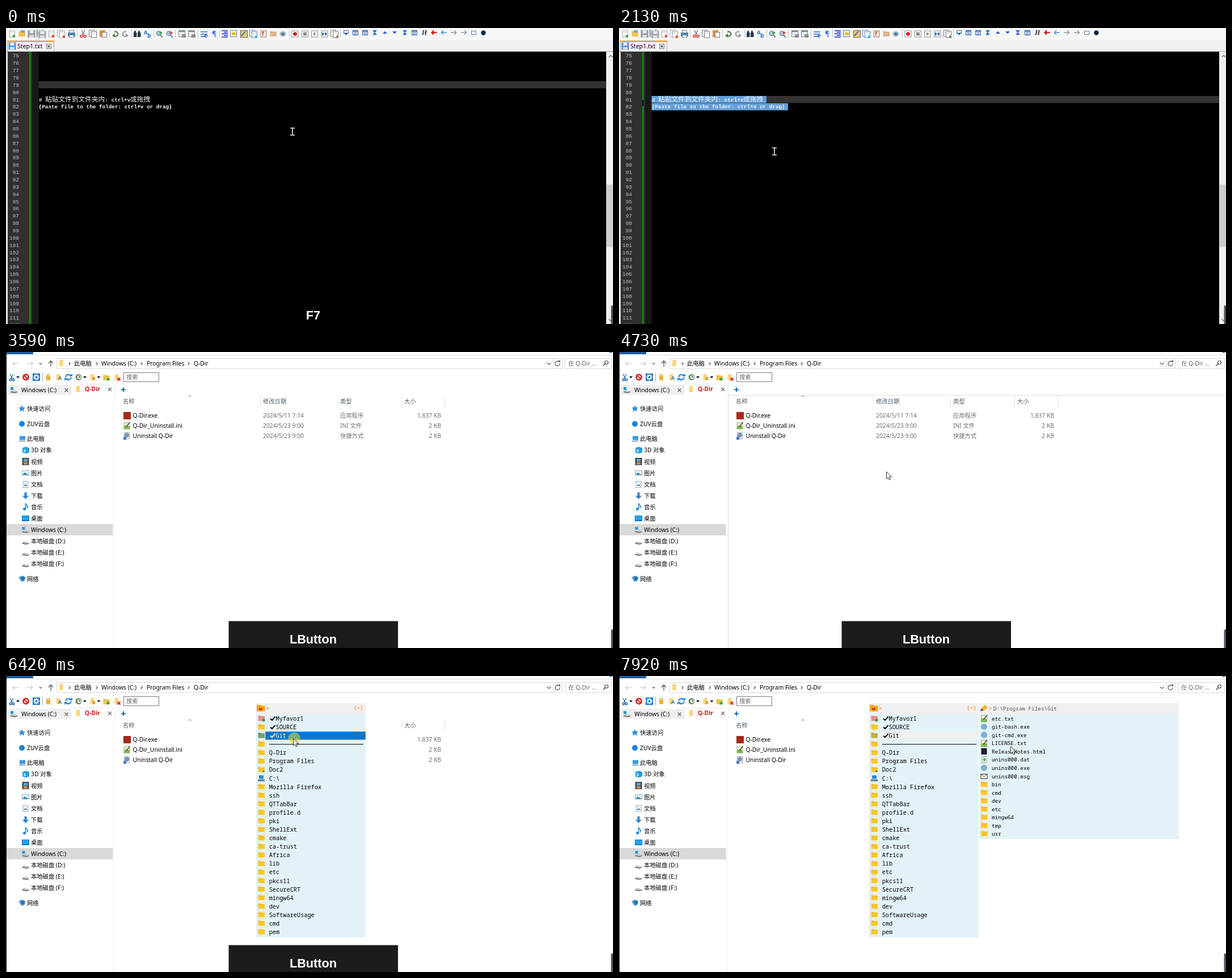
An HTML page with a canvas that plays this animation: 1070x523 px, repeating every 7990 ms.

```html
<!DOCTYPE html>
<html lang="zh">
<head>
<meta charset="utf-8">
<style>
html, body { margin: 0; width: 100%; height: 100%; overflow: hidden; background: #fff; }
canvas { display: block; }
</style>
</head>
<body>
<canvas id="stage" width="1070" height="523"></canvas>
<script>
const g = document.getElementById('stage').getContext('2d');
const LOOP = 7990;
const UI = '"Noto Sans", "Noto Sans CJK SC", "Noto Sans CJK", sans-serif';
const MONO = '"Noto Sans Mono", monospace';
const CODE = '"Liberation Mono", monospace';
const KEYS = '"Liberation Sans", sans-serif';

// ---- drawing helpers ----
function box(x, y, w, h, color) { g.fillStyle = color; g.fillRect(x, y, w, h); }
function frame(x, y, w, h, color, fill) {
  if (fill) box(x, y, w, h, fill);
  g.strokeStyle = color; g.lineWidth = 1; g.strokeRect(x + .5, y + .5, w - 1, h - 1);
}
function dot(x, y, r, color) { g.fillStyle = color; g.beginPath(); g.arc(x, y, r, 0, 7); g.fill(); }
function ring(x, y, r, color, width = 1.5, end = 6.3) {
  g.strokeStyle = color; g.lineWidth = width; g.beginPath(); g.arc(x, y, r, 0, end); g.stroke();
}
function trace(pts) {
  g.beginPath();
  for (let i = 0; i < pts.length; i += 2) g.lineTo(pts[i], pts[i + 1]);
}
function line(color, width, ...pts) { g.strokeStyle = color; g.lineWidth = width; trace(pts); g.stroke(); }
function poly(color, ...pts) { g.fillStyle = color; trace(pts); g.fill(); }
function text(s, x, y, { size = 10.3, color = '#000', font = UI, weight = 400, align = 'left' } = {}) {
  g.font = `${weight} ${size}px ${font}`;
  g.fillStyle = color; g.textAlign = align;
  g.fillText(s, x, y + size * .36);
}
function chevron(x, y, dx, dy, color = '#555', width = 1.2) {
  line(color, width, x - dx - 2 * dy, y - dy - 2 * dx, x + dx, y + dy, x - dx + 2 * dy, y - dy + 2 * dx);
}
function cross(x, y, r, color, width = 1.3) {
  line(color, width, x - r, y - r, x + r, y + r);
  line(color, width, x - r, y + r, x + r, y - r);
}
function arrow(x, y, dir, color, len = 4.5, width = 1.6) {
  line(color, width, x - len * dir, y, x + len * dir, y);
  line(color, width, x + (len - 3.5) * dir, y - 3.5, x + len * dir, y, x + (len - 3.5) * dir, y + 3.5);
}

// ---- icons, centred on x, y ----
function folder(x, y, color = '#ffc627') {
  box(x - 5.5, y - 5, 5, 3, color);
  box(x - 5.5, y - 4, 11.5, 8.5, color);
  box(x - 5.5, y - 3, 11.5, 1, 'rgba(170,110,0,.15)');
}
function slimFolder(x, y, mark) {
  box(x - 4, y - 5.5, 7, 11, '#f9d375');
  box(x - 4, y - 5.5, 2.5, 11, '#ffe49c');
  if (mark) box(x + 1, y, 4, 5, mark);
}
function page(x, y, mark, edge = '#9aa6b0') {
  frame(x - 5, y - 6, 10, 12, edge, '#fff');
  box(x - 3, y - 3, 6, 1, '#c3ccd3');
  if (mark) dot(x + 3, y + 4, 2.4, mark);
}
function pages(x, y, mark, edge) { page(x - 2, y - 1, null, edge); page(x + 2, y + 1, mark, edge); }
function floppy(x, y, color) {
  box(x - 6.5, y - 6.5, 13, 13, color);
  box(x - 3.5, y - 6, 7, 5, '#e9f1f7');
  box(x - 4, y + 1.5, 8, 5, '#d6dde2');
}
function note(x, y) {
  frame(x - 5.5, y - 5.5, 11, 12, '#9aa58c', '#f6f6e6');
  poly('#7dbb4c', x - 5, y + 6, x - 5, y + 1, x + 1, y - 1, x + 5, y + 2, x + 5, y + 6);
  line('#564a30', 1.6, x - 1, y + 2, x + 5.5, y - 6);
}
function drive(x, y, system) {
  poly('#c4c8cb', x - 6, y + 2, x - 3, y, x + 6, y + 2, x + 6, y + 4, x + 3, y + 5, x - 6, y + 4);
  line('#5c6063', 1.3, x - 6, y + 3.5, x + 2, y + 5, x + 6, y + 3.5);
  if (system) box(x - 6, y - 5, 5, 5, '#1f9ae0');
}
function table(x, y) {
  frame(x - 5, y - 4, 10, 9, '#2b62b8', '#fff');
  box(x - 5, y - 4, 10, 2.5, '#2b62b8');
  line('#2b62b8', 1, x - 3, y + .5, x + 3, y + .5);
  line('#2b62b8', 1, x - 3, y + 2.8, x + 3, y + 2.8);
}
function triangle(x, y, dir, color = '#2468c8') { poly(color, x - 4, y + 2 * dir, x + 4, y + 2 * dir, x, y - 2.5 * dir); }
function lens(x, y, mark) {
  line('#777', 2, x + 1, y + 1, x + 6, y + 6);
  dot(x - 1, y - 1, 4, '#a8c6dc'); ring(x - 1, y - 1, 4, '#5c7484', 1);
  dot(x + 3, y - 2, 2.3, mark);
}
function magnifier(x, y) { ring(x + 1.5, y - 1.5, 3, '#444', 1.2); line('#444', 1.5, x - 1, y + 1, x - 4.5, y + 4.5); }

// ---- editor ----
const rowY = n => 49 + (n - 75) * 12.86;
const rowBar = (n, width, color) => box(57.5, Math.round(rowY(n) - 6.5), width, 12.5, color);

function editorToolbar() {
  box(0, 0, 1070, 21, '#f7f7f7');
  for (const x of [125, 182, 221, 260, 298, 338, 376, 499, 589]) box(x, 3, 1, 14, '#c8c8c8');
  const y = 10.5;
  page(11, y, '#3ba83b');
  folder(28, y, '#f3c24e'); box(26, 4, 7, 4, '#6ba5d8');
  floppy(45, y, '#8e979d'); floppy(60, y - 1, '#a0a6aa'); floppy(64, y + 1, '#a0a6aa');
  page(80, y, '#e8502c'); pages(97, y, '#e8502c');
  box(109, 8, 13, 7, '#4d87b8'); frame(111, 4, 9, 5, '#6b7f8c', '#fff'); frame(111, 12, 9, 5, '#6b7f8c', '#fff');
  line('#777', 1.4, 133, 4, 138, 13); line('#777', 1.4, 139, 4, 134, 13);
  ring(133, 14.5, 2, '#d83030'); ring(139, 14.5, 2, '#d83030');
  pages(153, y, null, '#777');
  box(165, 4, 10, 12, '#d79a3c'); frame(169, 7, 9, 10, '#777', '#fff');
  for (const [x, dir, c] of [[193, -1, '#4c7c44'], [210, 1, '#999']]) {
    ring(x, 10.5, 4.2, c, 2.2);
    box(x + (dir < 0 ? -6 : 2), 6, 4, 9, '#f7f7f7');
    poly(c, x + 6 * dir, 13.5, x + dir, 9.5, x + dir, 17);
  }
  for (const x of [228, 235]) { box(x - 3, 8, 5.5, 8, '#26384a'); box(x - 2, 5, 3, 4, '#26384a'); }
  text('a', 243, 7, { color: '#246ac0', weight: 700 }); text('b', 249, 13, { color: '#246ac0', weight: 700 });
  lens(270, y, '#38a838'); lens(288, y, '#e04030');
  for (const x of [310, 327]) { frame(x - 6, 4, 12, 12, '#808a90', '#e8ecee'); box(x - 6, 4, 12, 3, '#808a90'); box(x, 11, 7, 6, '#8d8d8d'); }
  for (const [i, w] of [12, 12, 7].entries()) box(343, 6 + i * 4, w, 1.6, '#3777c4');
  arrow(353, 14, -1, '#3777c4', 3);
  text('¶', 363, y, { size: 12, color: '#3777e0', weight: 700 });
  for (let i = 0; i < 5; i++) box(i % 2 ? 384 : 380, 4 + i * 2.8, i % 2 ? 7 : 11, 1.5, '#2030c8');
  frame(395, 4, 12, 12, '#4a86c0', '#fff5c8'); box(398, 8, 7, 4, '#f0b030');
  frame(413, 4, 13, 13, '#557', '#f2d060'); line('#3a78c0', 2, 415, 14, 422, 6);
  pages(436, y, '#5aaae6', '#4a86c0');
  page(454, y, null, '#a06030'); text('f', 451, 10, { color: '#d05020', weight: 700 });
  folder(471, y, '#e2b48c');
  g.fillStyle = '#d0dde8'; g.beginPath(); g.ellipse(488, y, 6.5, 4, 0, 0, 7); g.fill();
  ring(488, y, 4, '#788', 1); dot(488, y, 2.5, '#2f6fa8');
  for (const x of [509.5, 527, 544, 561.5]) frame(x - 6, 4.5, 12, 12, '#8a9298', '#fafafa');
  dot(509.5, y, 3.3, '#d81818'); box(524, 7.5, 6, 6, '#8c8c8c');
  poly('#8c9c8c', 542, 7, 547, 10.5, 542, 14);
  poly('#2468b8', 557, 7, 561, 10.5, 557, 14); poly('#2468b8', 562, 7, 566, 10.5, 562, 14);
  pages(579, y, '#888', '#777');
  frame(595, 4, 9, 6, '#2b62b8', '#fff'); triangle(599.5, 10.5, -1);
  table(616, 8); table(633, 8); table(720, 8);
  for (const x of [650, 703]) { triangle(x, 6, -1); triangle(x, 10, 1); }
  triangle(668, 8, 1); triangle(685, 8, -1);
  text('H', 733, 8, { size: 11, font: '"Noto Serif", serif', weight: 'italic 700', color: '#333' });
  arrow(755, 8, -1, '#d81010', 4.5, 2.2); arrow(772, 8, -1, '#4a8ee0');
  arrow(789, 8, 1, '#999'); arrow(807, 8, 1, '#999');
  frame(820, 5, 9, 7, '#4a7eb8', '#fff');
  dot(841.5, 8.5, 4.2, '#10233f');
}

function editor(t) {
  const current = t < 700 ? 79 : t < 880 ? 83 : t < 1150 ? 82 : t < 2740 ? 81 : 88;
  box(0, 0, 1070, 523, '#000');
  editorToolbar();
  box(0, 21, 1070, 21, '#f0f0f0'); box(0, 41, 1070, 1, '#a0a0a0');
  frame(2, 22, 83, 20, '#a8a8a8', '#f5f5f5'); box(2, 22, 82, 3, '#faaa3c');
  floppy(11, 32, '#4b93d8');
  text('Step1.txt', 20, 32.5, { size: 10.6 });
  frame(71, 28, 9, 9, '#777'); cross(75.5, 32.5, 2, '#555');

  box(0, 42, 3, 481, '#e4e4e4');
  box(3, 42, 43, 481, '#303030'); box(46, 42, 11.5, 481, '#181818');
  box(41, 42, 2.4, 481, '#0c960c');
  if (t > 1450) box(41, 127, 2.4, 11, '#111');
  for (let n = 75; n < 113; n++) text(n, 23, rowY(n), { size: 9.4, color: '#c4c4c4', font: CODE, align: 'right' });

  rowBar(current, 1000.5, '#333');
  const selected = '#639ed8';
  if (t >= 1150 && t < 2740) rowBar(81, 202.5, selected);
  if (t >= 880 && t < 2740) rowBar(82, 240.5, selected);
  const bold = { size: 9.33, color: '#f4f4f4', font: CODE, weight: 700 };
  const han = { size: 11.7, color: '#f4f4f4', weight: 500 };
  text('#', 58, rowY(81), bold);
  text('粘贴文件到文件夹内', 69, rowY(81) - .5, han);
  text(': ctrl+v', 174.5, rowY(81), bold);
  text('或拖拽', 219, rowY(81) - .5, han);
  const english = '(Paste file to the folder: ctrl+v or drag)';
  text(english, 57.6, rowY(82), bold);
  text(english.replace(/[^():+]/g, ' '), 57.6, rowY(82), { ...bold, color: '#e6dc98' });
  if (t >= 2740 && t < 3320) box(57, 209, 1, 14, '#fff');

  box(1058, 42, 12, 481, '#f0f0f0'); box(1058.5, 277, 11.5, 110, '#cdcdcd');
  chevron(1066, 50, 0, -1.6); chevron(1066, 516, 0, 1.6);
}

// ---- file manager ----
const sidebar = [
  ['快速访问', 100], ['ZUV云盘', 127], ['此电脑', 153.5], ['3D 对象', 173.5], ['视频', 194], ['图片', 214],
  ['文档', 234], ['下载', 254], ['音乐', 274], ['桌面', 294], ['Windows (C:)', 314], ['本地磁盘 (D:)', 334.5],
  ['本地磁盘 (E:)', 354.5], ['本地磁盘 (F:)', 374.5], ['网络', 401]
];
const sideIcons = [
  y => poly('#2f8fdc', 28, y - 6, 30, y - 2, 34, y - 2, 31, y + 1, 32, y + 5.5, 28, y + 3, 24, y + 5.5, 25, y + 1, 22, y - 2, 26, y - 2),
  y => dot(28, y, 5, '#1683d8'),
  y => { box(24, y - 5, 10, 7, '#3a9be0'); line('#8fa3b0', 2, 23, y + 4, 34, y + 4); },
  y => { poly('#1e9ee6', 29, y - 4, 35, y - 6, 41, y - 4, 41, y + 4, 35, y + 6, 29, y + 4); poly('#8bd4f7', 31, y - 2, 35, y - 1, 35, y + 4, 31, y + 3); },
  y => { box(28.5, y - 7, 12, 13, '#3e4950'); box(31, y - 5, 7, 4.5, '#5ba6d8'); box(31, y + .5, 7, 4.5, '#c98a4c'); },
  y => { frame(28, y - 5, 13, 9, '#9ab', '#e7f3fa'); poly('#2b8cc4', 29, y + 3, 33, y - 1, 40, y + 3); },
  y => { page(34.5, y); box(32, y, 5, 3, '#5d9bc8'); },
  y => poly('#2b86d4', 32.5, y - 6, 36.5, y - 6, 36.5, y, 40, y, 34.5, y + 6, 29, y, 32.5, y),
  y => { dot(32.5, y + 3.5, 2.5, '#1a8bdc'); line('#1a8bdc', 1.6, 34.5, y + 3, 34.5, y - 6, 38.5, y - 1, 37, y + 2); },
  y => { box(28, y - 5, 13, 10, '#0f78c8'); box(29, y - 4, 11, 7, '#21a4ee'); },
  y => drive(34.5, y, true), y => drive(34.5, y), y => drive(34.5, y), y => drive(34.5, y),
  y => { poly('#5a9fd0', 22, y - 3, 28, y - 6, 34, y - 3, 32, y + 4, 27, y + 5); dot(30, y - 1, 3.5, '#2474b8'); }
];
const files = [
  ['Q-Dir.exe', '2024/5/11 7:14', '应用程序', '1,837 KB'],
  ['Q-Dir_Uninstall.ini', '2024/5/23 9:00', 'INI 文件', '2 KB'],
  ['Uninstall Q-Dir', '2024/5/23 9:00', '快捷方式', '2 KB']
];

function navigation() {
  box(0, 0, 48, 4, '#1f5f9f'); box(0, 5, 1070, 1, '#d9e2ea'); dot(1066, -1, 3, '#5a88b0');
  arrow(17, 20.5, -1, '#ccc', 5, 1.2); arrow(42, 20.5, 1, '#ccc', 5, 1.2); chevron(61, 20.5, 0, 1.1);
  line('#555', 1.3, 79, 26, 79, 16); line('#555', 1.3, 75, 20, 79, 15.5, 83, 20);
  frame(89, 11, 892, 19, '#d9d9d9'); slimFolder(97.5, 19.5);
  for (const x of [112, 160, 239, 322]) chevron(x, 20.5, 1.3, 0);
  text('此电脑', 120, 20.5); text('Windows (C:)', 168, 20.5); text('Program Files', 248, 20.5); text('Q-Dir', 331, 20.5);
  chevron(957, 20.5, 0, 1.7); box(964, 12, 1, 17, '#ddd');
  ring(972, 20.5, 4, '#555', 1.3, 5.3); poly('#555', 973, 15, 977, 15, 977, 19);
  frame(985, 11, 83, 19, '#d9d9d9'); text('在 Q-Dir ...', 991, 20.5, { color: '#666' }); magnifier(1057, 20);
}

function commands() {
  const y = 44.5;
  line('#2670b0', 1.3, 7, 39, 12, 48); line('#2670b0', 1.3, 13, 39, 8, 48); ring(8, 49, 1.8, '#2670b0'); ring(13, 49, 1.8, '#2670b0');
  for (const x of [21, 139, 163.5]) poly('#111', x - 3, 43, x + 3, 43, x, 46.5);
  ring(35, y, 4.6, '#dc2020', 2.6); line('#dc2020', 2.2, 32, 42, 38, 47);
  box(47, 38, 13, 13, '#1673cc'); ring(53.5, y, 3, '#fff', 1.8);
  for (let a = 0; a < 6.2; a += Math.PI / 4) dot(53.5 + 4.6 * Math.cos(a), y + 4.6 * Math.sin(a), 1, '#fff');
  box(64, 37, 1, 15, '#aaa');
  box(71, 43, 7, 7, '#f2b632'); ring(74.5, 42.5, 2.5, '#d89c28');
  slimFolder(92, y); text('A', 92, 46, { size: 9, weight: 700, color: '#2670b0' });
  ring(110, y, 4.7, '#1f86dc', 2.2, 2.6); g.save(); g.translate(220, 89); g.rotate(Math.PI); ring(110, y, 4.7, '#1f86dc', 2.2, 2.6); g.restore();
  poly('#1f86dc', 111, 43, 117, 43, 117, 38); poly('#1f86dc', 109, 46, 103, 46, 103, 51);
  dot(128, y, 5.5, '#5c8c5c'); dot(129, y, 3.6, '#dfe8df'); line('#333', 1, 129, 42, 129, y, 131, y);
  slimFolder(152, y, '#e0962a'); folder(177, y + 1, '#edc650'); dot(180, 48, 2.6, '#49a13c');
  slimFolder(195, y); cross(199, 48, 2.5, '#d82020', 1.8);
  frame(207, 36, 63, 17, '#7a7a7a'); text('搜索', 212, 44.5, { color: '#666' });
}

function fileManager(t) {
  box(0, 0, 1070, 523, '#fff');
  navigation();
  commands();
  box(3, 58, 112, 18, '#efefef'); drive(14, 67, true);
  text('Windows (C:)', 27, 67.5); cross(106.5, 67.5, 3, '#666', 1.2);
  frame(114, 56, 79, 21, '#e8e8e8', '#fff'); box(115, 75, 77, 3, '#fff');
  slimFolder(127, 65.5); text('Q-Dir', 139, 65.5, { color: '#d01818', weight: 700 }); cross(183, 66, 3, '#666', 1.2);
  line('#0f6fc4', 2, 203, 66.5, 211, 66.5); line('#0f6fc4', 2, 207, 62.5, 207, 70.5);

  box(1, 304, 187.5, 20, '#d9d9d9');
  sidebar.forEach(([label, y], i) => {
    sideIcons[i](y);
    text(label, i < 3 || i === 14 ? 37 : 44, y);
  });
  const active = t >= 4100 && t < 5500;
  box(active ? 192 : 190, 77, 1, 446, active ? '#dcdcdc' : '#f0f0f0');
  if (active) box(192, 76, 878, 1, '#dcdcdc');

  chevron(324, 78, 0, -1.3, '#777', 1);
  const heads = [['名称', 206], ['修改日期', 453], ['类型', 589], ['大小', 702]];
  for (const [label, x] of heads) text(label, x, 87.5, { color: '#4f5b6c' });
  for (const x of [448, 584, 697, 773]) box(x, 77, 1, 22, '#e5e5e5');
  const grey = { color: '#6d6d6d' };
  files.forEach(([name, date, kind, size], i) => {
    const y = 112.5 + 18 * i;
    text(name, 223.5, y); text(date, 453, y, grey); text(kind, 589, y, grey);
    text(size, 767, y, { ...grey, align: 'right' });
  });
  box(207, 106, 13, 13, '#a52a1c'); note(213, 130);
  page(213, 148); dot(213, 147, 4, '#7794b8'); box(207, 150, 5, 5, '#4a7ab5');
  box(0, 0, 1, 523, '#111');
}

// ---- launcher popup ----
const places = ['Myfavor1', 'SOURCE', 'Git', '', 'Q-Dir', 'Program Files', 'Doc2', 'C:\\', 'Mozilla Firefox', 'ssh',
  'QTTabBar', 'profile.d', 'pki', 'ShellExt', 'cmake', 'ca-trust', 'Africa', 'lib', 'etc', 'pkcs11', 'SecureCRT',
  'mingw64', 'dev', 'SoftwareUsage', 'cmd', 'pem'];
const recent = ['tclConfig.sh', 'Q-Dir_Uninstall.ini', 'tkConfig.sh', 'git-prompt.sh', '0-3.gif', 'env.sh', 'Pinon.png',
  'Image2Include.ahk', 'install-options.txt', 'MIT.txt', 'package-versions.txt', 'docx2txt.config', '1.gif',
  'CONTRIBUTING.md', 'CONTRIBUTORS.md', 'TEST.DOC', 'GPL-2.0-only.txt', 'GPL-2.0-or-later.txt',
  'LicenseRef-Trademark.txt', 'welcome.png', 'broken.png'];
const gitFiles = ['etc.txt', 'git-bash.exe', 'git-cmd.exe', 'LICENSE.txt', 'ReleaseNotes.html', 'unins000.dat',
  'unins000.exe', 'unins000.msg', 'bin', 'cmd', 'dev', 'etc', 'mingw64', 'tmp', 'usr'];
const picture = (x, y) => { box(x - 3, y - 5, 8, 10, '#fff'); box(x - 5, y - 3, 7, 4, '#3b93d0'); };
const photo = (x, y) => { box(x - 4, y - 5, 9, 10, '#fff'); box(x - 5, y - 3, 7, 4, '#8cc7a0'); };
const fileIcons = {
  gif: picture, png: photo,
  ahk: (x, y) => { frame(x - 5, y - 6, 10, 12, '#4a7fae', '#fff'); text('H', x, y, { size: 9, weight: 700, color: '#245c90', align: 'center' }); },
  md: (x, y) => { box(x - 5, y - 5, 10, 11, '#fff'); text('MD', x, y, { size: 5, weight: 700, color: '#555', align: 'center' }); },
  DOC: (x, y) => box(x - 5, y - 5, 10, 11, '#2b7cd3'),
  exe: (x, y) => dot(x, y, 5.5, '#7fb0d0'),
  html: (x, y) => box(x - 5, y - 5.5, 10, 11, '#1c1c2c'),
  dat: (x, y) => { frame(x - 4, y - 6, 9, 12, '#999', '#fff'); arrow(x, y, 1, '#3d9a4c', 2.5); },
  msg: (x, y) => { frame(x - 6, y - 4, 12, 9, '#333', '#fff'); line('#333', 1, x - 6, y - 4, x, y + 1, x + 6, y - 4); }
};
const orange = { size: 10.3, color: '#f07818', font: MONO };

function placesPanel(t) {
  box(441, 48, 193, 414, '#e3f2f6'); box(441, 48, 193, 19, '#f0f0f0');
  box(442, 51, 7, 3, '#f5a81c'); box(442, 52.5, 14.5, 10, '#f5a81c');
  poly('#d83020', 446, 56, 449, 57, 452, 56, 452, 58.5, 449, 61.5, 446, 58.5);
  text('>', 458, 57, orange); text('[+]', 613, 57, { ...orange, size: 9.3 });
  const focus = t >= 6210 && t < 6490, chosen = t >= 6210;
  if (focus) frame(457, 98, 177, 14.5, '#8c8474', '#0078d7');
  else if (chosen) box(457, 98, 177, 14.5, '#f0f0f0');
  places.forEach((name, i) => {
    const y = 75 + i * 15.08, on = i === 2 && chosen;
    if (name === 'C:\\') { box(446, y - 5, 8, 6, '#2088d8'); box(444, y + 2, 12, 3.5, '#6b7f8c'); }
    else folder(450, y, i === 0 ? '#f28a88' : on ? (focus ? '#6f9d78' : '#bfae4a') : '#ffc627');
    if (i === 0) dot(454, y + 3, 2.8, '#3f9f58');
    if (i === 6) dot(454, y + 3, 1.8, '#5b8d38');
    const color = on && focus ? '#fff' : '#000';
    if (i < 3) line(color, 2, 466, y + .5, 469, y + 3, 474.5, y - 3);
    if (i === 3) box(464, 120, 166, 1.2, '#222');
    text(name, i < 3 ? 475.5 : 463.7, y + .3, { size: 10.28, color, font: MONO });
  });
}

function filePanel(names, height) {
  box(635, 48, 352, height, '#e3f2f6'); box(635, 48, 352, 19, '#f0f0f0');
  names.forEach((name, i) => {
    const y = 75 + i * 14.55, ext = name.split('.').pop();
    (ext === name ? folder : fileIcons[ext] || note)(643.5, y);
    text(name, 657, y + .3, { size: 9.33, font: MONO });
  });
}

function recentPanel() {
  filePanel(recent, 342);
  dot(643, 56.5, 6.5, '#2368b4'); text('>', 651.5, 57, orange);
  box(973, 67, 14, 308, '#f0f0f0'); box(973.5, 82, 13, 112, '#cdcdcd');
  box(635, 375, 352, 15, '#f0f0f0'); box(649, 376, 296, 13, '#cdcdcd');
  chevron(980, 75, 0, -1.6, '#444', 1.6); chevron(980, 368, 0, 1.6, '#444', 1.6);
  chevron(642, 382, -1.6, 0, '#444', 1.6); chevron(965, 382, 1.6, 0, '#444', 1.6);
}

function gitPanel() {
  filePanel(gitFiles, 240);
  poly('#f0b429', 639, 57, 645, 51, 650, 55, 644, 61); poly('#444', 637, 62, 639, 57, 643, 61);
  text('>', 651.5, 57, orange);
  text('D:\\Program Files\\Git', 660, 57.3, { size: 9.33, color: '#555', font: MONO });
}

// ---- pointer and key display ----
const editorPath = [[190, 505, 183], [700, 66, 151], [910, 62, 145], [990, 57, 144], [1450, 28, 122],
  [1730, 28, 122], [2130, 274, 218]];
const managerPath = [[3750, 545, 535], [4320, 475, 232], [4730, 471, 211], [5140, 468, 206], [5410, 468, 213],
  [5600, 468, 213], [6140, 505, 109], [6420, 506, 110], [6890, 506, 110], [7420, 775, 205], [7630, 762, 198],
  [7920, 690, 124]];

function along(path, t) {
  const i = path.findIndex(p => p[0] > t);
  if (i === 0) return path[0].slice(1);
  if (i < 0) return path[path.length - 1].slice(1);
  const [a, b] = [path[i - 1], path[i]];
  const u = (t - a[0]) / (b[0] - a[0]), k = u * u * (3 - 2 * u);
  return [a[1] + (b[1] - a[1]) * k, a[2] + (b[2] - a[2]) * k];
}

function pointer(x, y, dir = 1) {
  g.save();
  g.translate(x, y); g.scale(dir, 1);
  const shape = [.5, .5, .5, 13, 3.4, 10.3, 5.4, 15, 7.6, 14, 5.6, 9.5, 9.6, 9.2, .5, .5];
  poly('#fff', ...shape); line('#333', 1, ...shape);
  g.restore();
}

function beam(x, y) {
  box(x - .8, y - 6.5, 1.6, 13, '#eee');
  box(x - 4, y - 7, 8, 1.5, '#eee'); box(x - 4, y + 5.5, 8, 1.5, '#eee');
}

const presses = [[0, 190, 'F7'], [700, 1730, 'LButton'], [2740, 4800, 'LButton'], [5140, 5210, 'Ctrl + Alt'],
  [5210, 5850, 'Ctrl + Alt + Space'], [6210, 6890, 'LButton']];

function keyDisplay(t) {
  const [, end, label] = presses.filter(p => p[0] <= t).pop();
  g.globalAlpha = Math.max(0, Math.min(1, 1 - (t - end) / 280));
  box(392.5, 475.5, 298.5, 48, 'rgba(0,0,0,.89)');
  text(label, 541.5, 507.3, { size: 21.7, color: '#fff', font: KEYS, weight: 700, align: 'center' });
  g.globalAlpha = 1;
}

function draw(now) {
  const t = now % LOOP;
  if (t < 3590) {
    editor(t);
    keyDisplay(t);
    const [x, y] = along(editorPath, t);
    if (x < 57) pointer(x, y - 6, -1); else beam(x, y);
  } else {
    fileManager(t);
    if (t >= 5350) placesPanel(t);
    if (t >= 5350 && t < 6280) recentPanel();
    if (t >= 6490) gitPanel();
    keyDisplay(t);
    const [x, y] = along(managerPath, t);
    if (t >= 6210 && t < 6490) dot(508, 110, 10.5, 'rgba(235,220,40,.55)');
    pointer(x, y);
  }
  g.fillStyle = '#4b5560'; g.beginPath(); g.roundRect(1066.5, 490, 8, 40, 3); g.fill();
  requestAnimationFrame(draw);
}
requestAnimationFrame(draw);
</script>
</body>
</html>
```
